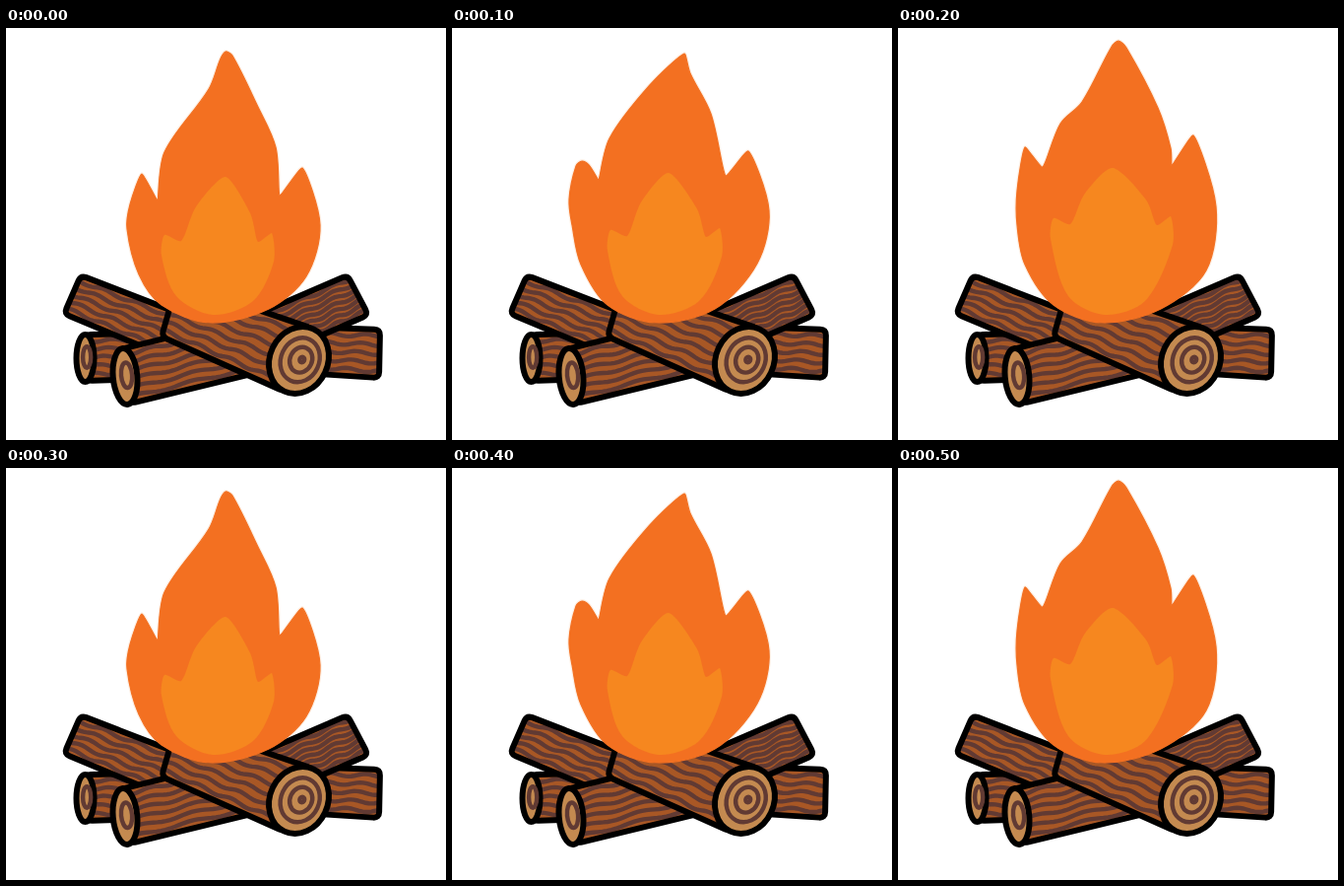
These frames come from a looping animation (447 px wide and 418 px high, 600 ms). An HTML page:

```html
<!DOCTYPE html>
<html lang="en">
<head>
<meta charset="utf-8">
<title>Campfire</title>
<style>
  html, body { margin: 0; width: 100%; height: 100%; overflow: hidden; background: #fff; }
  svg { display: block; width: 100%; height: 100%; }
  .edge { fill: none; stroke: #000; stroke-width: 6; stroke-linejoin: round; }
  .wood { fill: #a85725; }
  .grain { fill: none; stroke: #613a33; stroke-width: 4.4; stroke-linecap: round; }
  .face { fill: #c48a50; stroke: #000; stroke-width: 6; }
  .halo { fill: #fdeee2; stroke: #fdeee2; stroke-width: 3.5; stroke-linejoin: round; }
  .outer { fill: #f37021; stroke: #f37021; stroke-width: 1.2; stroke-linejoin: round; }
  .inner { fill: #f6871f; }
</style>
</head>
<body>
<svg viewBox="0 0 447 418">
  <g id="halos"></g>
  <g id="logs"></g>
  <g id="flames"></g>
</svg>
<script>
const NS = 'http://www.w3.org/2000/svg';
const STEP = 100;
const $ = id => document.getElementById(id);
const parse = s => s.trim().split(/\s+/).map(p => p.split(',').map(Number));
const mix = (a, b, t) => a + (b - a) * t;
const lerp = (p, q, t) => [mix(p[0], q[0], t), mix(p[1], q[1], t)];
const dist = (p, q) => Math.hypot(q[0] - p[0], q[1] - p[1]);

function add(parent, tag, attrs = {}) {
  const el = document.createElementNS(NS, tag);
  for (const k in attrs) el.setAttribute(k, attrs[k]);
  return parent.appendChild(el);
}

// Closed curve through points; the sharper the turn, the shorter the handles.
function blob(pts) {
  const n = pts.length;
  const pull = pts.map((p, i) => {
    const a = pts[(i + n - 1) % n], b = pts[(i + 1) % n], span = dist(a, b);
    const dot = (p[0] - a[0]) * (b[0] - p[0]) + (p[1] - a[1]) * (b[1] - p[1]);
    const k = (1 + dot / (dist(a, p) * dist(p, b))) / 6;
    return [(b[0] - a[0]) / span * k, (b[1] - a[1]) / span * k];
  });
  let d = 'M' + pts[0];
  pts.forEach((p, i) => {
    const j = (i + 1) % n, q = pts[j], len = dist(p, q);
    d += `C${p[0] + pull[i][0] * len} ${p[1] + pull[i][1] * len} ` +
         `${q[0] - pull[j][0] * len} ${q[1] - pull[j][1] * len} ${q}`;
  });
  return d + 'Z';
}

function rounded(pts, r) {
  const n = pts.length;
  return 'M' + pts.map((p, i) => {
    const a = pts[(i + n - 1) % n], b = pts[(i + 1) % n];
    return `${lerp(p, a, r / dist(p, a))}Q${p} ${lerp(p, b, r / dist(p, b))}`;
  }).join('L') + 'Z';
}

// corners: top start, top end, bottom end, bottom start
function log(id, corners) {
  const quad = parse(corners), [a, b, c, e] = quad;
  const d = rounded(quad, 6), g = add($('logs'), 'g');
  add(add(g, 'clipPath', { id }), 'path', { d });
  add(g, 'path', { d, class: 'wood' });
  const bands = add(g, 'g', { 'clip-path': `url(#${id})` });
  const length = dist(a, b), count = Math.round(dist(a, e) / 9);
  for (let i = 0; i < count; i++) {
    const pts = [];
    for (let x = 0; x <= length; x += 3) {
      const p = lerp(lerp(a, b, x / length), lerp(e, c, x / length), (i + 0.75) / (count + 0.5));
      p[1] += 1.5 * Math.sin(x / 6 + i * 0.8);
      pts.push(p);
    }
    add(bands, 'path', { d: 'M' + pts.join('L'), class: 'grain' });
  }
  add(g, 'path', { d, class: 'edge' });
}

function disc(cx, cy, rx, ry, tilt, rings) {
  const g = add($('logs'), 'g', { transform: `translate(${cx} ${cy}) rotate(${tilt})` });
  add(g, 'ellipse', { rx, ry, class: 'face' });
  for (const r of rings) {
    add(g, 'ellipse', { cx: 3 * (1 - r), cy: -2 * (1 - r), rx: rx * r, ry: ry * r, class: 'grain' });
  }
}

log('rightLow', '300,303 380,306 379,355 300,350');
log('rightBack', '235,299 347,251 368,291 295,323');
log('leftSmall', '80,311 140,310 140,356 82,358');
disc(80.5, 335, 9, 24, 0, [0.45]);
log('leftBack', '76,251 185,293 155,330 59,290');
log('leftFront', '116,326 190,308 250,351 126,381');
disc(121, 353.5, 12.3, 28.5, -5, [0.45]);
log('front', '174,258 312,305 283,369 158,313');
disc(297.5, 337, 29.4, 34.9, 25, [0.66, 0.38, 0.08]);

// Clockwise from the lower left; the base is common to all poses.
const outerBase = parse('267,285 207,299 158,281');
const innerBase = parse('251,277 210,291 173,272');

function innerFlame([tip, hornY, left, right]) {
  const a = [left + 20, hornY + 7], b = [right - 18, hornY + 8];
  return [
    [left, hornY + 22], [left + 3, hornY + 1], a,
    [mix(a[0], tip[0], 0.35), mix(a[1], tip[1], 0.55)], tip,
    [mix(b[0], tip[0], 0.25), mix(b[1], tip[1], 0.45)], b,
    [right - 4, hornY - 1], [right - 2, hornY + 28], ...innerBase
  ];
}

const poses = [
  {
    outer: `135,250 123,204 126,179 138,148 154,175 161,126 206,62 218,31 223,24 230,28
      255,78 274,121 278,170 301,142 319,200 305,252`,
    inner: [[223, 151], 209, 158, 274]
  },
  {
    outer: `131,240 122,200 119,174 126,140 132,135 139,139 149,154 160,112 200,59 236,26
      242,46 263,87 278,150 301,125 322,185 310,239`,
    inner: [[220, 147], 204, 158, 276]
  },
  {
    outer: `129,240 121,200 121,165 129,121 147,141 165,97 187,75 217,19 224,13 232,20
      264,81 277,122 278,140 300,109 323,181 313,246`,
    inner: [[218, 142], 192, 155, 281]
  }
];

const groups = poses.map(({ outer, inner }) => {
  const halo = add($('halos'), 'g'), flame = add($('flames'), 'g');
  const d = blob([...parse(outer), ...outerBase]);
  add(halo, 'path', { d, class: 'halo' });
  add(flame, 'path', { d, class: 'outer' });
  add(flame, 'path', { d: blob(innerFlame(inner)), class: 'inner' });
  return [halo, flame];
});

function draw() {
  const now = Math.floor(performance.now() / STEP) % poses.length;
  groups.forEach((pair, i) => pair.forEach(g => { g.style.display = i === now ? '' : 'none'; }));
  requestAnimationFrame(draw);
}
draw();
</script>
</body>
</html>
```
